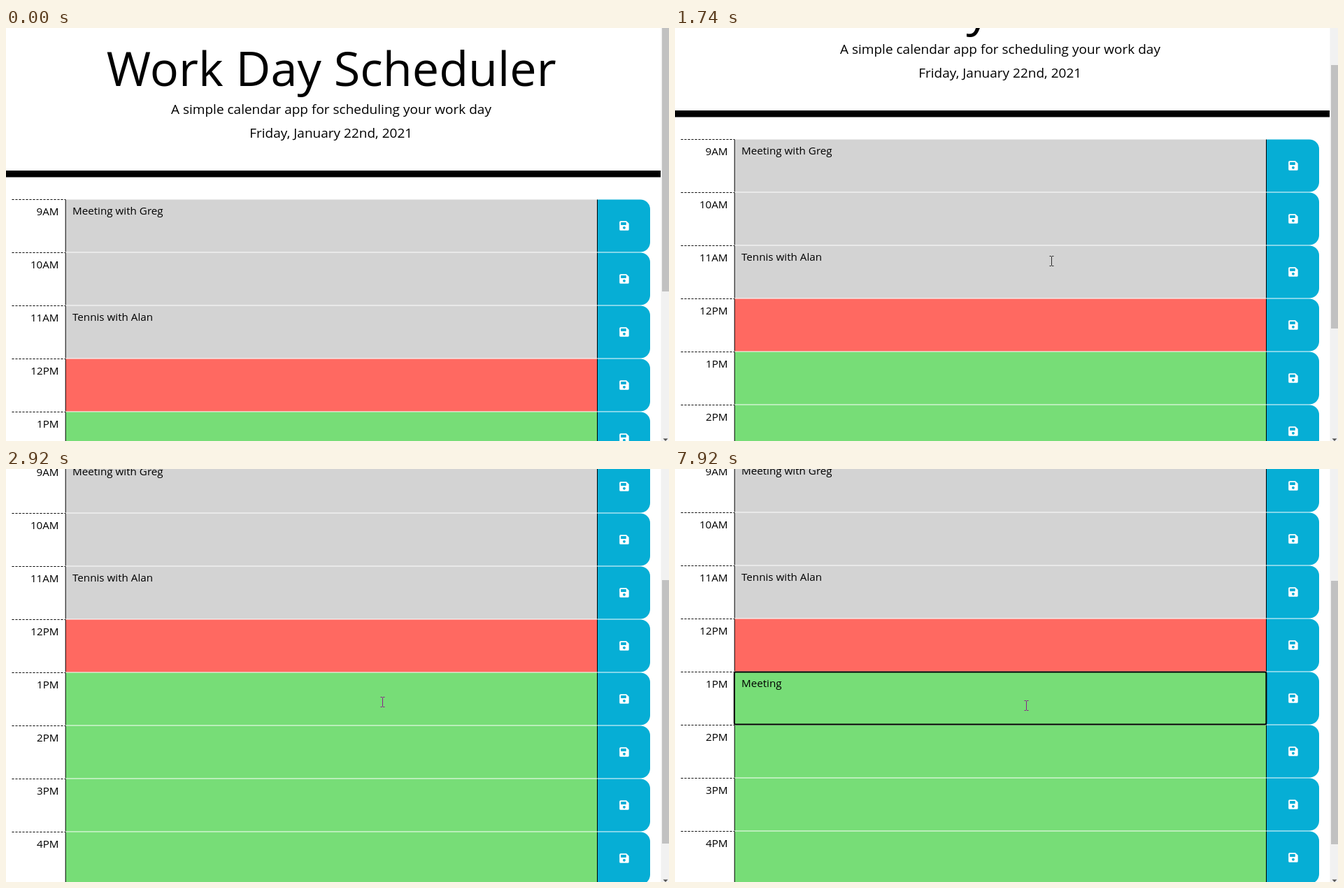
These frames come from a looping animation (948x591 px, 7.99 s). An HTML page:

```html
<!DOCTYPE html>
<html lang="en">
<head>
<meta charset="utf-8">
<title>Work Day Scheduler</title>
<style>
  html, body { margin: 0; width: 100%; height: 100%; overflow: hidden; background: #fff; }
  svg { display: block; width: 948px; height: 591px; font: 15.2px "Open Sans", sans-serif; }
  .title { font-size: 68.4px; }
  .lead { font-size: 19px; }
  #beam { mix-blend-mode: difference; }
</style>
</head>
<body>
<svg viewBox="0 0 948 591">
  <defs>
    <path id="save" fill="#fff" fill-rule="evenodd"
      d="M1.5 0H9.9L13.5 3.6V12Q13.5 13.5 12 13.5H1.5Q0 13.5 0 12V1.5Q0 0 1.5 0ZM2.3 1.9Q1.9 1.9 1.9 2.3V5.4Q1.9 5.8 2.3 5.8H9.2Q9.6 5.8 9.6 5.4V2.3Q9.6 1.9 9.2 1.9ZM6.75 7.7a1.92 1.92 0 1 0 .01 0Z"/>
  </defs>
  <rect width="948" height="591" fill="#fff"/>
  <g id="page">
    <g text-anchor="middle">
      <text class="title" x="465.2" y="83">Work Day Scheduler</text>
      <text class="lead" x="465" y="123">A simple calendar app for scheduling your work day</text>
      <text class="lead" x="464.7" y="157">Friday, January 22nd, 2021</text>
    </g>
    <rect y="204" width="936" height="9.5"/>
    <g id="rows"></g>
    <g id="focus">
      <rect x="84.8" y="549.5" width="760.6" height="75" rx="2" fill="none" stroke="#000" stroke-width="2"/>
      <text id="typed" x="95" y="571"></text>
      <rect id="caret" y="555" width="1" height="21"/>
    </g>
  </g>
  <rect x="936.5" width="11.5" height="591" fill="#f1f1f1"/>
  <rect id="thumb" x="938" width="10" height="377" fill="#c1c1c1"/>
  <path d="M939.5 587.5h7l-3.5 3.5z" fill="#505050"/>
  <path id="arrow" d="M.5 .5V16.5L4.2 13 6.6 18.5 9 17.5 6.6 12.2H11.5Z" fill="#fff" stroke="#000"/>
  <path id="beam" fill="none" stroke="#fff" d="M-3 -6.5H-.5M.5 -6.5H3M0 -6V7M-3 7.5H-.5M.5 7.5H3"/>
</svg>
<script>
const LOOP = 7990, ROW = 76, TOP = 245, NOW = 12;
const $ = id => document.getElementById(id);

const notes = { 9: 'Meeting with Greg', 11: 'Tennis with Alan' };

function rowMarkup(hour) {
  const label = hour > 12 ? hour - 12 : hour;
  const color = hour < NOW ? '#d3d3d3' : hour === NOW ? '#ff6961' : '#77dd77';
  return `
  <g transform="translate(0 ${TOP + (hour - 9) * ROW})">
    <path d="M8.5 .5H85" stroke="#000" stroke-dasharray="3 2"/>
    <text x="75.6" y="23.4" text-anchor="end">${label}${hour < 12 ? 'AM' : 'PM'}</text>
    <rect x="85" y=".5" width="761" height="75" fill="${color}"/>
    <path d="M85.2 .5v75M845.5 .5v75" stroke="#000"/>
    <text x="95" y="22">${notes[hour] || ''}</text>
    <path d="M846 .5h61a14 14 0 0 1 14 14v47a14 14 0 0 1 -14 14h-61z" fill="#06aed5"/>
    <use href="#save" x="877.2" y="31.2"/>
  </g>`;
}
$('rows').innerHTML = Array.from({ length: 8 }, (_, i) => rowMarkup(9 + i)).join('');

const smooth = p => p * p * (3 - 2 * p);
const easeOut = p => 1 - (1 - p) ** 2.3;
const progress = (t, start, end) => Math.min(1, Math.max(0, (t - start) / (end - start)));

// Each wheel notch glides the page by a fixed distance.
const notches = [1571, 2099, 2757], NOTCH = 86.33;
const scrollAt = t => Math.round(
  notches.reduce((sum, start) => sum + NOTCH * smooth(progress(t, start, start + 175)), 0));

// The pointer is sampled a few times along each move; bow bends the path downwards.
const moves = [
  { start: 280, end: 830, steps: 7, from: [880, 566], to: [538, 333], ease: easeOut, bow: 0 },
  { start: 3000, end: 3460, steps: 6, from: [538, 333], to: [350, 326], ease: smooth, bow: 7 },
  { start: 7760, end: 7920, steps: 2, from: [350, 326], to: [502, 338], ease: smooth, bow: 0 }
];

function pointerAt(t) {
  const move = moves.filter(m => m.start <= t).pop();
  if (!move) return null;
  const { start, end, steps, from, to, ease, bow } = move;
  const p = Math.floor(progress(t, start, end) * steps) / steps;
  const [x, y] = from.map((a, i) => a + (to[i] - a) * ease(p));
  return [Math.round(x), Math.round(y + bow * Math.sin(Math.PI * p))];
}

// The click, then one key press per letter; every edit restarts the caret blink.
const word = 'Meeting', BLINK = 550;
const edits = [3450, 5340, 5570, 5800, 6600, 6830, 6910, 6990];

const show = (el, on) => el.setAttribute('visibility', on ? 'visible' : 'hidden');
const place = (el, x, y) => el.setAttribute('transform', `translate(${x} ${y})`);

function drawPointer(t) {
  const pointer = pointerAt(t);
  const overButton = pointer && pointer[0] > 846;
  show($('arrow'), overButton);
  show($('beam'), pointer && !overButton);
  if (!pointer) return;
  const [x, y] = pointer;
  place($('arrow'), x, y);
  place($('beam'), x + 0.5, y);
}

function drawTyping(t) {
  const done = edits.filter(time => time <= t);
  const typed = $('typed');
  show($('focus'), done.length);
  typed.textContent = word.slice(0, Math.max(0, done.length - 1));
  show($('caret'), done.length && Math.floor((t - done.pop()) / BLINK) % 2 === 0);
  $('caret').setAttribute('x', Math.round(95 + typed.getComputedTextLength()));
}

function draw(t) {
  const scroll = scrollAt(t);
  place($('page'), 0, -scroll);
  $('thumb').setAttribute('y', Math.round(scroll * 0.616));
  drawPointer(t);
  drawTyping(t);
}

function tick() {
  draw(performance.now() % LOOP);
  requestAnimationFrame(tick);
}
tick();
</script>
</body>
</html>
```
